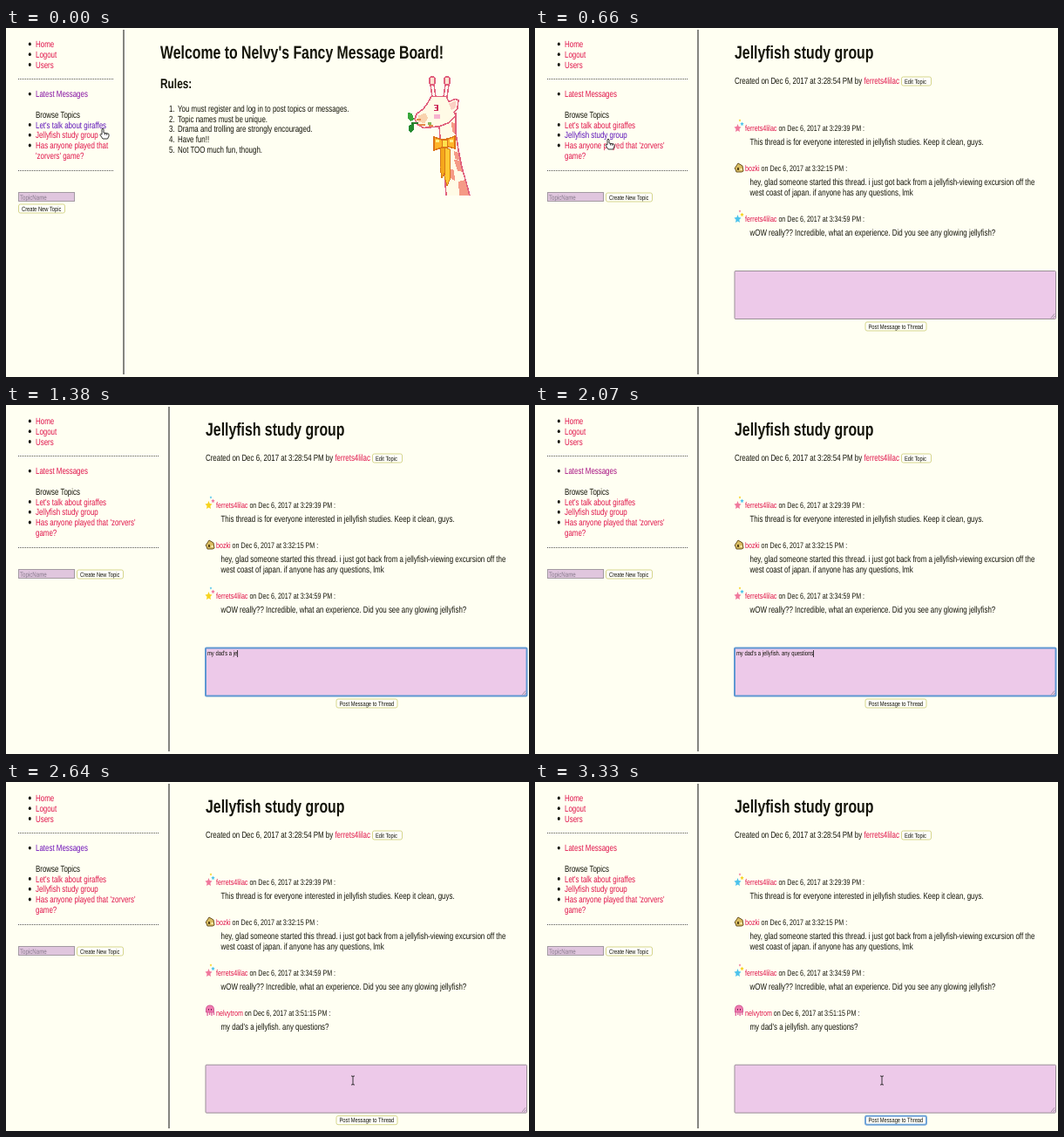
Recreate the animation shown at these times as an HTML page. Size 600 by 400 pixels, loop 3360 ms.

```html
<!DOCTYPE html>
<html lang="en">
<head>
<meta charset="utf-8">
<title>Message board</title>
<style>
html, body { margin: 0; width: 100%; height: 100%; overflow: hidden; background: #fffff2; }
svg { display: block; width: 600px; height: 400px; }
text { font-family: "Liberation Sans", Arial, sans-serif; fill: #14140a; white-space: pre; text-rendering: geometricPrecision; }
.b { font-weight: bold; }
.link { fill: #e0134a; }
.hover { fill: #5d12b8; }
.hint { fill: #85788a; }
.btn { fill: #fffffa; stroke: #d6d68c; }
.btn.on { stroke: #6fa3d8; stroke-width: 2; }
.field { fill: #edc9e9; stroke: #9a8f98; }
.field.on { stroke: #5f97d2; stroke-width: 2; }
.pixel { shape-rendering: crispEdges; }
.off { display: none; }
</style>
</head>
<body>
<svg id="stage" viewBox="0 0 600 400"></svg>
<script>
const LOOP = 3360, STEP = 30;
const OPEN = 600, FOCUS = 930, TYPE = 970, CLICK = 2370, POST = 2400, REFOCUS = 3000;
const REPLY = "my dad's a jellyfish. any questions?";
const LINE = 11.8, TOPIC_Y = 114.5;
const BODY = 10.43, SMALL = 9.39, BUTTON = 7.6;

// The page is shown narrower than it is tall.
const SQUEEZE = 0.76;
const text = (x, y, s, { size = BODY, cls = "", id = "", end = false } = {}) =>
  `<text ${id && `id="${id}"`} class="${cls}" font-size="${size}" text-anchor="${end ? "end" : "start"}"
    transform="translate(${x} ${y}) scale(${SQUEEZE} 1)">${s}</text>`;
const link = s => `<tspan class="link">${s}</tspan>`;
const rect = (x, y, w, h, attrs = "") => `<rect x="${x}" y="${y}" width="${w}" height="${h}" ${attrs}/>`;
const poly = (points, fill, attrs = "") => `<polygon points="${points}" fill="${fill}" ${attrs}/>`;
const path = (d, attrs) => `<path d="${d}" ${attrs}/>`;
const bullet = y => `<ellipse cx="27.3" cy="${y - 3.6}" rx="1.5" ry="1.9" fill="#14140a"/>`;
const button = (x, y, w, s, id = "") =>
  rect(x + .5, y + .5, w - 1, 10, `rx="2" class="btn" ${id && `id="${id}"`}`) + text(x + 4, y + 8.1, s, { size: BUTTON });

function sidebar(edge, lastTopic, buttonX, buttonY) {
  const right = edge - 12;
  const hr = y => path(`M14 ${y}H${right}`, 'stroke="#555" stroke-dasharray="1 1"');
  const item = (y, s, cls) => bullet(y) + text(34, y, s, { cls: "link " + cls });
  const topics = ["Let's talk about giraffes", "Jellyfish study group", lastTopic[0]];
  return path(`M${edge} 2V397`, 'stroke="#858580" stroke-width="2"') +
    ["Home", "Logout", "Users"].map((s, i) => item(22 + i * LINE, s, "")).join("") +
    hr(58.5) + item(79.2, "Latest Messages", "latest") +
    text(34, 102.8, "Browse Topics") +
    topics.map((s, i) => item(TOPIC_Y + i * LINE, s, "topic" + i)).join("") +
    text(34, TOPIC_Y + 3 * LINE, lastTopic[1], { cls: "link topic2" }) +
    hr(163.5) +
    rect(14.5, 188.5, 64, 10, 'fill="#e0c6de" stroke="#a39aa2"') +
    text(16, 197, "TopicName", { size: 8.1, cls: "hint" }) +
    button(buttonX, buttonY, 54, "Create New Topic");
}

function giraffe() {
  const line = 'stroke="#e0607c" stroke-width="1.6"';
  const horn = (x, lean) =>
    path(`M${x} 79L${x + lean} 64M${x + 4} 79L${x + 4 + lean} 64`, line + ' fill="none"') +
    rect(x + lean - 1, 55.5, 6, 9, `rx="2" fill="#fbe3d0" ${line}`);
  const spots = [
    "511,108 517,110 517,122 512,119", "514,141 519,143 521,152 515,150",
    "514,151 522,152 525,165 518,164", "509,161 514,163 515,175 510,172",
    "519,176 527,174 530,187 531,192 520,192"
  ];
  return `<g class="pixel">` +
    path("M497 108L498 126L503 140V165L505 192H532L528 177L523 160L519 140L516 120V96Z", 'fill="#fffbe6"') +
    spots.map(p => poly(p, "#f59a86")).join("") +
    path("M497 111L498 126L503 140V165L505 192M532 192L528 177L523 160L519 140L516 120V97", line + ' fill="none"') +
    `<g id="head">` + horn(489, -2) + horn(502, 2) +
    poly("488,78 484,85 479,92 471,98 469,104 472,110 479,114 490,113 498,112 508,108 516,100 514,96 518,92 519,82 515,81 508,84 505,78", "#fffbe6", line) +
    poly("473,100 481,97 484,103 480,109 473,107", "#f9d3ae") +
    poly("508,86 516,83 516,90 511,94", "#fbd0c4") +
    path("M471 104H476M474 110H481M485 111H490", 'stroke="#e58a4a" stroke-width="2"') +
    path("M491 88H495V94H491M492 91H495", 'stroke="#cc2858" stroke-width="1.6" fill="none"') +
    rect(491, 98, 7, 5, 'fill="#f7b4cf"') + rect(484, 107, 4, 3, 'fill="#8ab35a"') + `</g>` +
    `<g id="leaf">` +
    path("M464 107H472", 'stroke="#2c7a2c" stroke-width="2"') +
    poly("460,95 465,96 467,103 463,105 460,101", "#39a83c") +
    poly("461,110 467,107 467,114 464,118 461,116", "#248a30") + `</g>` +
    poly("499,137 504,137 503,166 500,172 498,160", "#f5a81c", 'stroke="#d67a18"') +
    poly("504,137 509,139 509,174 506,181 503,170", "#ffc933", 'stroke="#d67a18"') +
    poly("491,125 500,128 507,127 515,124 515,138 507,136 500,137 491,140", "#ffb52a", 'stroke="#dc7418" stroke-width="1.4"') +
    rect(500, 128, 6, 8, 'fill="#ffe14d" stroke="#dc7418"') +
    rect(493, 128, 4, 3, 'fill="#fff08a"') + rect(509, 128, 4, 3, 'fill="#fff08a"') + `</g>`;
}

function welcome() {
  const rules = [
    "You must register and log in to post topics or messages.", "Topic names must be unique.",
    "Drama and trolling are strongly encouraged.", "Have fun!!", "Not TOO much fun, though."
  ];
  return sidebar(135, ["Has anyone played that", "'zorvers' game?"], 14, 201.5) +
    text(177, 35, "Welcome to Nelvy's Fancy Message Board!", { size: 2 * BODY, cls: "b" }) +
    text(177, 69, "Rules:", { size: 1.5 * BODY, cls: "b" }) +
    rules.map((s, i) => {
      const y = 95.6 + i * 11.9;
      return text(193.5, y, i + 1 + ".", { end: true }) + text(197, y, s);
    }).join("") + giraffe();
}

const star = (x, y, r) => {
  const pts = Array.from({ length: 10 }, (_, i) => {
    const a = i * Math.PI / 5 - Math.PI / 2, k = i % 2 ? r * .48 : r;
    return (x + k * Math.cos(a)).toFixed(1) + "," + (y + 1.2 * k * Math.sin(a)).toFixed(1);
  });
  return `<polygon points="${pts.join(" ")}"/>`;
};
const stars = (y, id) =>
  `<g id="${id}">${star(232.5, y, 4.2)}${star(237.5, y - 5, 2.2)}${star(235, y - 9, 1.4)}</g>`;
const hut = y =>
  poly(`229,${y - 4} 233,${y - 10} 238,${y - 7} 239,${y - 1} 237,${y} 231,${y} 230,${y - 3}`, "#d9bd62", 'stroke="#6b5420"') +
  rect(232, y - 5, 2, 3, 'fill="#57451c"') + rect(235.5, y - 4, 2, 2, 'fill="#fff3b8"');
const jelly = y =>
  path(`M229.5 ${y - 4}V${y - 7}Q229.5 ${y - 12} 234 ${y - 12}T238.5 ${y - 7}V${y - 4}Z`, 'fill="#f07ab0" stroke="#c64a86" stroke-width=".8"') +
  path(`M232.5 ${y - 8}v1.6M235.5 ${y - 8}v1.6`, 'stroke="#5c1c40"') +
  path(`M230.3 ${y - 4}v4M232.8 ${y - 4}v3M235.2 ${y - 4}v4M237.7 ${y - 4}v3`, 'id="legs" stroke="#e0609c" stroke-width="1.3"');

const message = (y, icon, who, time, lines) => icon +
  text(241, y, `${link(who)} on Dec 6, 2017 at ${time} PM :`, { size: SMALL }) +
  lines.map((s, i) => text(246.5, y + 16 + i * 11.5, s)).join("");

function thread() {
  const fan = "ferrets4lilac";
  return sidebar(187, ["Has anyone played that 'zorvers'", "game?"], 81, 188.5) +
    text(229, 35, "Jellyfish study group", { size: 2 * BODY, cls: "b" }) +
    text(229, 64, "Created on Dec 6, 2017 at 3:28:54 PM by " + link(fan)) +
    button(420, 55.5, 35, "Edit Topic") +
    message(118.3, stars(115, "stars0"), fan, "3:29:39",
      ["This thread is for everyone interested in jellyfish studies. Keep it clean, guys."]) +
    message(164.3, hut(165), "bozki", "3:32:15",
      ["hey, glad someone started this thread. i just got back from a jellyfish-viewing excursion off the",
       "west coast of japan. if anyone has any questions, lmk"]) +
    message(222.2, stars(219, "stars1"), fan, "3:34:59",
      ["wOW really?? Incredible, what an experience. Did you see any glowing jellyfish?"]) +
    `<g id="reply">${message(268.4, jelly(268), "nelvytrom", "3:51:15", [REPLY])}</g>` +
    `<g id="form">` + rect(229, 278.5, 368.5, 55, 'id="area" class="field" rx="1"') +
    path("M592 332.5l4-5M594.5 332.5l2-2.5", 'stroke="#8f8590" stroke-width=".8"') +
    text(231, 287.4, "", { size: 7.7, id: "typed" }) +
    rect(0, 281, .8, 8, 'id="caret" fill="#111"') +
    button(378.5, 336.5, 71, "Post Message to Thread", "post") + `</g>`;
}

const pointer =
  path("M-1 1Q0-1 1 1V5L6 6Q7 6 7 7V9L5.5 12H0L-3 7.5Q-3 6-1 7ZM2.5 5.5V7.5M4.6 6V7.8",
    'id="hand" fill="#fff" stroke="#222" stroke-width=".9"') +
  path("M-2-5H-.5L0-4L.5-5H2M0-4V4M-2 5H-.5L0 4L.5 5H2", 'id="beam" fill="none" stroke="#222" stroke-width=".9"') +
  path("M0 0V10L2.3 8L3.8 12L5.2 11.2L3.7 7.6H6.5Z", 'id="arrow" fill="#111" stroke="#fff" stroke-width=".7"');

document.getElementById("stage").innerHTML =
  rect(0, 0, 600, 400, 'fill="#fffff2"') +
  `<g id="welcome">${welcome()}</g><g id="thread">${thread()}</g><g id="pointer">${pointer}</g>`;

const $ = id => document.getElementById(id);
const all = sel => document.querySelectorAll(sel);
const show = (id, on) => $(id).classList.toggle("off", !on);
const move = (id, x, y) => $(id).setAttribute("transform", `translate(${x} ${y})`);

const MOUSE = [[0, 111, 115], [60, 111, 115], [270, 87, 143], [330, 87, 143], [480, 84, 127],
  [720, 84, 127], [900, 330, 300], [2190, 330, 300], [2340, 398, 342], [LOOP, 398, 342]];
const GLOW = [[0, .8], [300, .5], [540, 0], [1860, 0], [2070, .5], [2400, 1], [2760, 1], [3200, 0], [LOOP, 0]];

function sample(keys, t, ease = k => k) {
  const i = Math.max(1, keys.findIndex(k => k[0] >= t));
  const [a, b] = [keys[i - 1], keys[i]];
  const k = ease((t - a[0]) / (b[0] - a[0]));
  return a.slice(1).map((v, n) => v + (b[n + 1] - v) * k);
}
const smooth = k => k * k * (3 - 2 * k);
const mix = (a, b, k) => `rgb(${a.map((v, i) => Math.round(v + (b[i] - v) * k))})`;

function paintStars(id, t, lead) {
  const colors = ["#4cc3ec", "#f7d31e", "#f0789c"];
  const pos = t < POST ? (t + lead - 661) / 160 : (t + lead - POST) / 160 + .8;
  const n = Math.floor(pos) + 300;
  [...$(id).children].forEach((s, i) => s.setAttribute("fill", colors[(n + i) % 3]));
}

function draw(t) {
  const posted = t >= POST, typing = t >= FOCUS && t < CLICK;
  show("welcome", t < OPEN);
  show("thread", t >= OPEN);

  const [x, y] = sample(MOUSE, t, smooth);
  const row = Math.floor((y - 105.5) / LINE);
  const hover = x < 120 && row >= 0 ? Math.min(row, 2) : -1;
  for (let i = 0; i < 3; i++) all(".topic" + i).forEach(e => e.classList.toggle("hover", i === hover));
  const top = posted ? 324 : 278;
  const inArea = x > 229 && y > top && y < top + 56;
  show("pointer", t < TYPE || t >= 2190);
  show("hand", hover >= 0);
  show("beam", inArea);
  show("arrow", hover < 0 && !inArea);
  move("pointer", x, y);

  const glow = mix([224, 19, 74], [110, 16, 184], sample(GLOW, t)[0]);
  all(".latest").forEach(e => e.style.fill = glow);

  const beat = Math.floor(t / 150) % 2;
  move("head", 0, beat ? 0 : .5);
  move("leaf", beat ? 0 : 1, beat ? 0 : 2);
  paintStars("stars0", t, 0);
  paintStars("stars1", t, 25);
  move("legs", beat ? .8 : 0, 0);

  show("reply", posted);
  move("form", 0, posted ? 45.7 : 0);
  $("area").classList.toggle("on", typing);
  $("post").classList.toggle("on", t >= REFOCUS || t >= CLICK && !posted);
  const count = Math.max(0, Math.floor((t - TYPE) / 31.4));
  $("typed").textContent = posted ? "" : REPLY.slice(0, count);
  show("caret", typing);
  if (typing) $("caret").setAttribute("x", 231 + $("typed").getComputedTextLength() * SQUEEZE);
}

const start = performance.now();
function tick() {
  const t = (performance.now() - start) % LOOP;
  draw(Math.floor(t / STEP) * STEP);
  requestAnimationFrame(tick);
}
tick();
</script>
</body>
</html>
```
